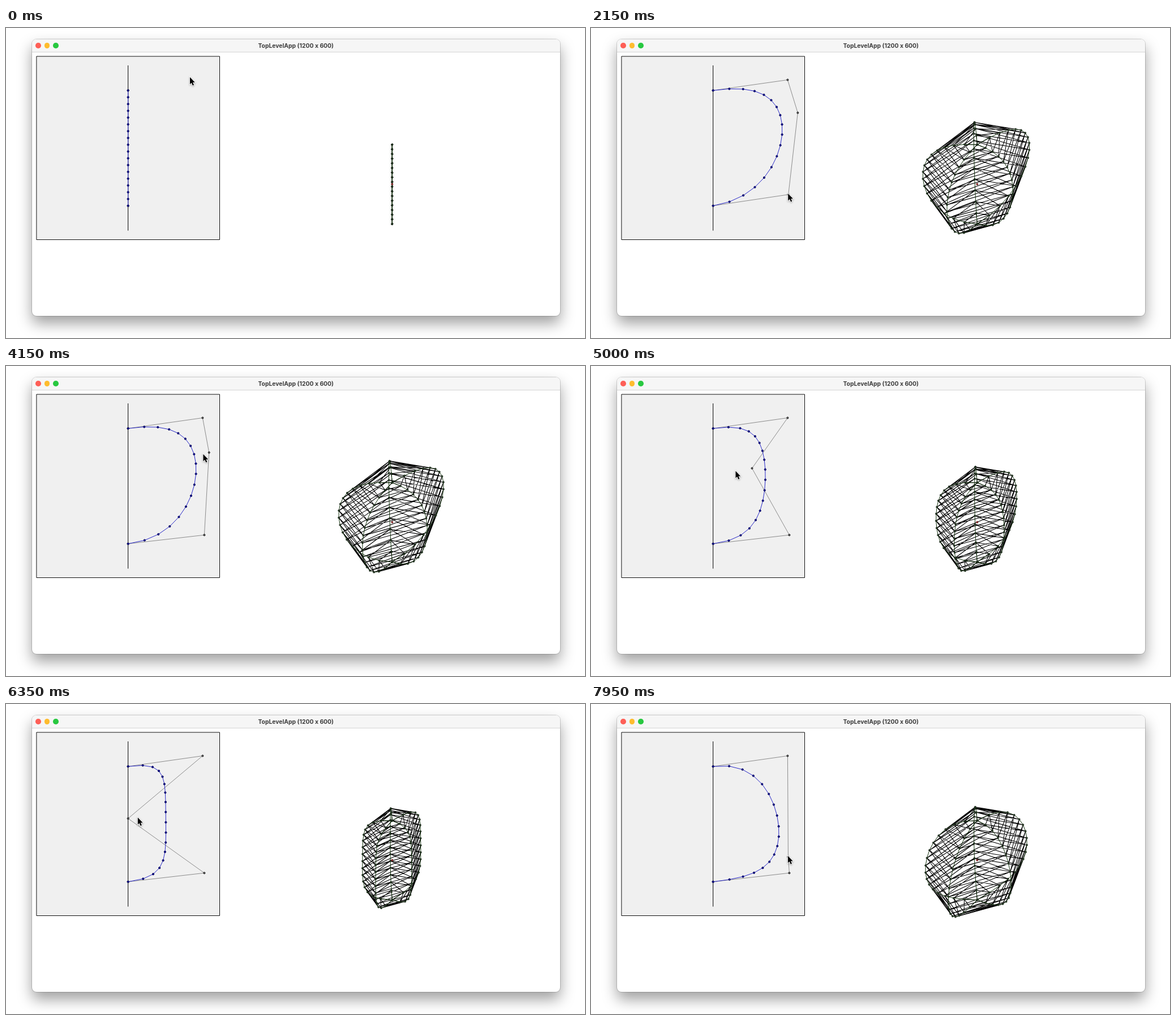
An HTML page with a canvas that plays this animation: 1023x547 px, repeating every 8000 ms.

```html
<!DOCTYPE html>
<html lang="en">
<head>
<meta charset="utf-8">
<title>Surface of revolution</title>
<style>
html, body { margin: 0; width: 100%; height: 100%; overflow: hidden; background: #fff; }
.window {
  position: absolute; left: 46px; top: 20px; width: 932.5px; height: 487.5px;
  border-radius: 8px; background: #fff; overflow: hidden;
  box-shadow: 0 0 0 1px rgba(0,0,0,.16), 0 13px 26px rgba(0,0,0,.38);
}
.bar {
  height: 22px; background: #f6f6f6; border-bottom: 1px solid #d4d4d4;
  font: 700 10.36px/22px Inter, "Open Sans", sans-serif; color: #3d3d3d; text-align: center;
}
.bar i { position: absolute; top: 6px; width: 9.6px; height: 9.6px; border-radius: 50%; }
canvas { position: absolute; left: 0; top: 0; }
</style>
</head>
<body>
<div class="window">
  <div class="bar">
    <i style="left:6px;background:#fe5f57"></i>
    <i style="left:21.5px;background:#febc2e"></i>
    <i style="left:37px;background:#28c840"></i>
    TopLevelApp (1200 x 600)
  </div>
</div>
<canvas id="stage" width="1023" height="547"></canvas>
<script>
const g = document.getElementById('stage').getContext('2d');
const LOOP = 8000, STEP = 50, LAG = 150, SEGMENTS = 17, SPOKES = 5;
const AXIS = 215.7, TOP = [AXIS, 110.2], BOTTOM = [AXIS, 313.7];

// Path of the mouse: time, x, y
const hand = [
  [0, 325.5, 88.5], [600, 347.4, 91.5], [850, 347.4, 91.5], [1150, 365.3, 149.6],
  [1500, 365.3, 149.6], [2000, 348, 292], [2500, 350.4, 298.2], [3350, 350.4, 298.2],
  [3800, 365.3, 149.6], [3900, 365.3, 149.6], [4700, 313, 174], [5300, 199, 200],
  [5750, 190, 202], [6200, 215.7, 202], [6950, 304, 202], [7100, 319.5, 208.5],
  [7800, 348.4, 269.8]
];
// When each control point is held; the first grab adds it
const grabs = [[[150, 800]], [[950, 1500], [3850, LOOP]], [[2150, 3200]]];

function mix(a, b, u) {
  return [a[0] + (b[0] - a[0]) * u, a[1] + (b[1] - a[1]) * u];
}

function handAt(t) {
  const n = hand.findIndex(k => k[0] > t);
  if (n < 0) return hand[hand.length - 1].slice(1);
  const [t0, ...a] = hand[n - 1], [t1, ...b] = hand[n];
  return mix(a, b, (t - t0) / (t1 - t0));
}

// A held point trails the mouse and rests where it was let go
function pointAt(holds, t) {
  const late = t - LAG;
  const [from, to] = holds.filter(h => late >= h[0]).pop() || holds[0];
  return handAt(Math.min(Math.max(late, from), to));
}

function bezier(pts, u) {
  while (pts.length > 1) pts = pts.slice(1).map((p, i) => mix(pts[i], p, u));
  return pts[0];
}

function lines(paths, color, width = 1) {
  g.beginPath();
  for (const path of paths) path.forEach((p, i) => i ? g.lineTo(...p) : g.moveTo(...p));
  g.strokeStyle = color;
  g.lineWidth = width;
  g.stroke();
}

function dots(pts, fill, radius, edge) {
  g.fillStyle = fill;
  g.strokeStyle = edge;
  g.lineWidth = 1;
  for (const [x, y] of pts) {
    g.beginPath();
    g.arc(x, y, radius, 0, 7);
    g.fill();
    g.stroke();
  }
}

function drawEditor(control, curve) {
  g.beginPath();
  g.rect(53.9, 50, 323.6, 323.5);
  g.fillStyle = '#f0f0f0';
  g.fill();
  g.strokeStyle = '#111';
  g.lineWidth = 1;
  g.stroke();
  lines([[[AXIS, 66], [AXIS, 357.5]]], '#000');
  lines([control], '#8c8c8c');
  dots(control, '#777', 1.5, '#000');
  lines([curve], '#2a2ac8');
  dots(curve, '#1414a8', 1.6, '#00004c');
}

// Revolves the curve; turn spins it about its axis, lean tilts it sideways
function drawMesh(curve, turn, lean) {
  const spokes = Array.from({ length: SPOKES }, (_, k) => {
    const a = turn + k * 2 * Math.PI / SPOKES;
    const dx = .812 * Math.sin(a), dy = lean * Math.sin(a) - .51 * Math.cos(a);
    return curve.map(([x, y]) => [682.3 + (x - AXIS) * dx, 205.8 + (y - TOP[1]) * .688 + (x - AXIS) * dy]);
  });
  const across = [];
  spokes.forEach((spoke, k) => {
    const next = spokes[(k + 1) % SPOKES];
    spoke.forEach((p, i) => {
      across.push([p, next[i]]);
      if (i < SEGMENTS) across.push([p, next[i + 1]]);
    });
  });
  lines(across, '#000', 1.1);
  lines(spokes, '#12300c');
  for (const spoke of spokes) dots(spoke, '#3c5a38', 1.4, '#0a140a');
  dots([[682.3, 275.6]], '#b83838', 1.5, '#4a0c0c');
}

function drawCursor([x, y]) {
  g.save();
  g.translate(x - .5, y - 1.7);
  g.beginPath();
  for (const p of [[0, 0], [0, 12.5], [2.8, 9.9], [4.9, 14.6], [7, 13.7], [5, 9.2], [8.8, 9.1]]) g.lineTo(...p);
  g.closePath();
  g.shadowColor = 'rgba(0,0,0,.35)';
  g.shadowBlur = 3;
  g.shadowOffsetY = 1;
  g.strokeStyle = '#fff';
  g.lineWidth = 1.6;
  g.stroke();
  g.shadowColor = 'transparent';
  g.fillStyle = '#000';
  g.fill();
  g.restore();
}

function draw(now) {
  const t = Math.floor(now % LOOP / STEP) * STEP;
  const added = grabs.filter(holds => t >= holds[0][0]).map(holds => pointAt(holds, t));
  const control = [TOP, ...added, BOTTOM];
  const curve = Array.from({ length: SEGMENTS + 1 }, (_, i) => bezier(control, i / SEGMENTS));
  g.clearRect(0, 0, 1023, 547);
  drawEditor(control, curve);
  if (added.length < 3) drawMesh(curve, .36, .19);
  else drawMesh(curve, -.06, -.19);
  drawCursor(handAt(t));
  requestAnimationFrame(draw);
}
requestAnimationFrame(draw);
</script>
</body>
</html>
```
